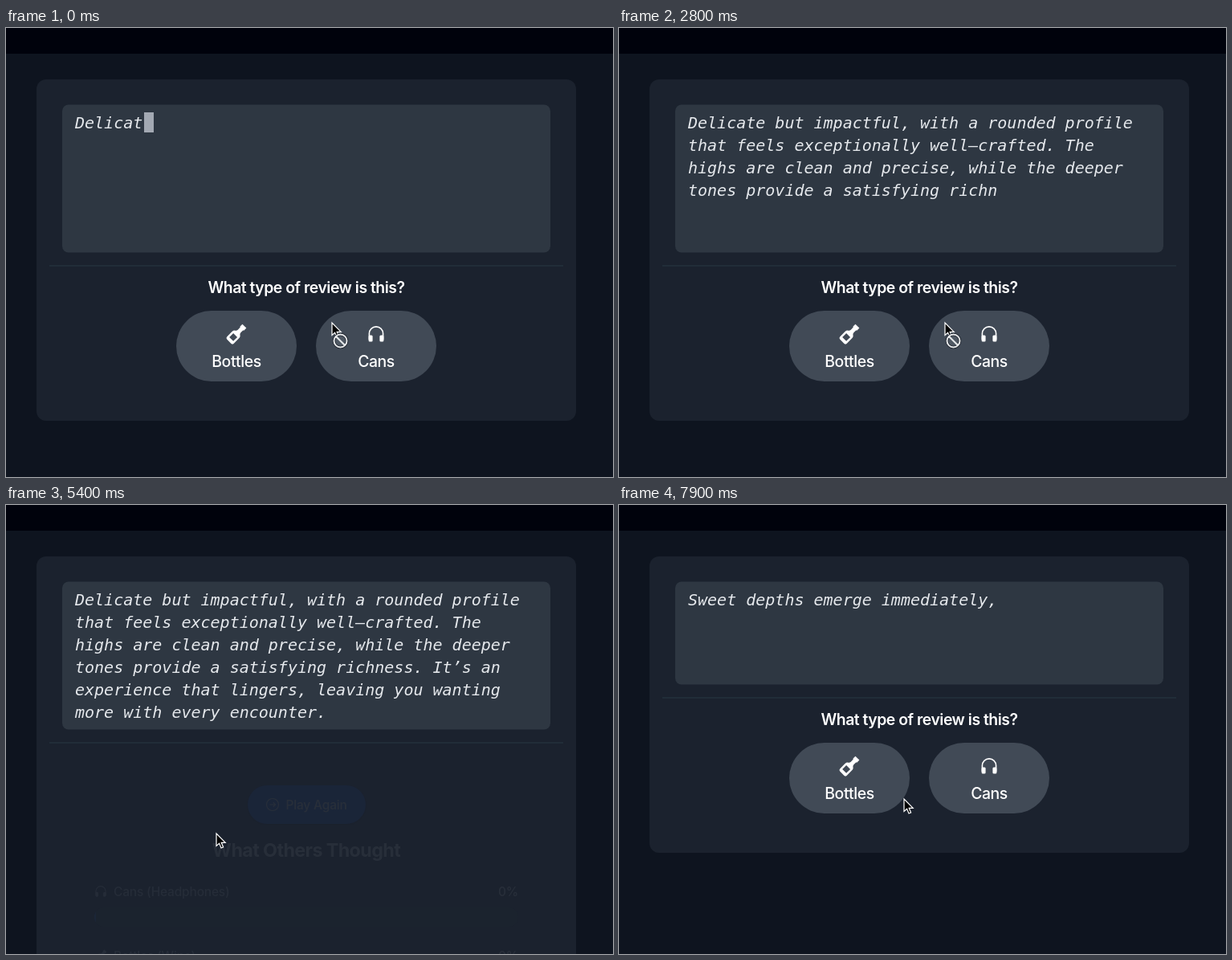
Write an HTML page that moves like this. It is 756 px wide and 559 px high and loops after 8000 ms.

```html
<!DOCTYPE html>
<html lang="en">
<head>
<meta charset="utf-8">
<title>Review guessing game</title>
<style>
  html, body { margin: 0; width: 100%; height: 100%; overflow: hidden; background: #0e141f; }
  svg { display: block; width: 756px; height: 559px; }
  text {
    font: 500 15.5px Inter, "Open Sans", sans-serif;
    font-optical-sizing: none;
    letter-spacing: -.012em;
    fill: #fff;
  }
  .mid { text-anchor: middle; }
  .end { text-anchor: end; }
  .large { font-size: 19.4px; letter-spacing: -.021em; }
  .question { font-size: 19.4px; font-weight: 600; letter-spacing: -.025em; }
  .heading { font-size: 23.3px; font-weight: 700; letter-spacing: -.026em; }
  .label { fill: #d5d9df; }
  #review { font: italic 20px "DejaVu Sans Mono", monospace; letter-spacing: 0; fill: #e5e8ec; }
  .shadow { filter: drop-shadow(0 1px 1px #0008); }
</style>
</head>
<body>
<svg viewBox="0 0 756 559">
  <defs>
    <path id="bottle" transform="rotate(45)" fill-rule="evenodd"
      d="M-3.5-14h7v4l-1 1v4q0 2 2.5 3.5q1 1 1 3v9q0 2.5-2.5 2.5h-7q-2.5 0-2.5-2.5v-9q0-2 1-3q2.5-1.5 2.5-3.5v-4l-1-1zM-3.5 2h7v7h-7z"/>
    <g id="phones">
      <path d="M-8.6 7V-.5a8.6 8.6 0 0 1 17.2 0V7" fill="none" stroke="currentColor" stroke-width="1.6"/>
      <rect x="-9.4" y="1.5" width="5" height="8" rx="1.5"/>
      <rect x="4.4" y="1.5" width="5" height="8" rx="1.5"/>
    </g>
    <clipPath id="track"><rect x="110" y="501" width="528" height="24" rx="12"/></clipPath>
  </defs>

  <rect width="756" height="559" fill="#0e141f"/>
  <rect width="756" height="32" fill="#00020c"/>
  <rect id="card" x="38" y="64" width="672" rx="12" fill="#1b222e"/>
  <rect id="box" x="70" y="95.5" width="608" rx="8" fill="#2e3742"/>
  <text id="review"></text>
  <rect id="caret" width="12" height="25" fill="#a3a9b3"/>

  <g id="lower">
    <rect x="54" y="295.5" width="640" height="1" fill="#283842"/>
    <g id="choices">
      <text class="mid question" x="374" y="330">What type of review is this?</text>
      <g id="bottles">
        <rect x="212" y="352" width="150" height="88" rx="44" fill="#414a56"/>
        <rect class="tint" x="212" y="352" width="150" height="88" rx="44" fill="#d32020"/>
        <use href="#bottle" x="287" y="381" fill="#fff"/>
        <text class="mid large" x="287" y="422">Bottles</text>
      </g>
      <g id="cans">
        <rect x="386" y="352" width="150" height="88" rx="44" fill="#414a56"/>
        <rect class="tint" x="386" y="352" width="150" height="88" rx="44" fill="#1e58e6"/>
        <use href="#phones" x="461" y="381" fill="#fff" color="#fff"/>
        <text class="mid large" x="461" y="422">Cans</text>
      </g>
    </g>
  </g>

  <g id="results">
    <g id="again">
      <rect class="shadow" x="301" y="349" width="147" height="48" rx="24" fill="#1e58e6"/>
      <path d="M324.5 373a7.5 7.5 0 0 1 15 0a7.5 7.5 0 0 1-15 0M328.5 373h7M332.7 370.2l2.8 2.8l-2.8 2.8"
        fill="none" stroke="#fff" stroke-width="1.1"/>
      <text x="348.5" y="378.5">Play Again</text>
    </g>
    <text class="mid heading" x="374" y="437.5">What Others Thought</text>
    <use href="#phones" transform="translate(118 481) scale(.7)" fill="#d5d9df" color="#d5d9df"/>
    <text class="label" x="134" y="486.5">Cans (Headphones)</text>
    <text class="end" id="cansShare" x="638" y="486.5"></text>
    <g clip-path="url(#track)">
      <rect x="110" y="501" width="528" height="24" fill="#2e3742"/>
      <rect id="bar" x="110" y="501" height="24" fill="#3374f2"/>
    </g>
    <use href="#bottle" transform="translate(118 561) scale(.6)" fill="#d5d9df"/>
    <text class="label" x="134" y="566.5">Bottles (Wine)</text>
    <text class="end" id="bottlesShare" x="638" y="566.5"></text>
  </g>

  <g id="pointer">
    <path d="M0 0V15.5L3.6 12.2L6 18L8.6 16.9L6.2 11.3H11.2Z" stroke="#fff" stroke-width="1.2"/>
    <g id="blocked" fill="none">
      <circle cx="10.5" cy="22.5" r="8" fill="#505964" stroke="#20262f" stroke-width="3.6"/>
      <path d="M2.5 22.5a8 8 0 0 1 16 0a8 8 0 0 1-16 0M5 17l11 11" stroke="#e6e8ea" stroke-width="2"/>
    </g>
  </g>
</svg>

<script>
const LOOP = 8000, ENABLE = 3400, CHOOSE = 5300, RESTART = 7320;
const COLUMNS = 47, CHAR = 12.04, LINE = 28;

const FIRST = "Delicate but impactful, with a rounded profile that feels exceptionally well–crafted. " +
  "The highs are clean and precise, while the deeper tones provide a satisfying richness. " +
  "It’s an experience that lingers, leaving you wanting more with every encounter.";
const SECOND = "Sweet depths emerge immediately,";

// Keyframes are [time, value...]
const TYPED = [[0, 7], [1800, 111.3], [2800, 168.3], [4100, 237.3], [4383, 252.3]];
const POINTER = [
  [0, 406, 367], [ENABLE, 406, 367], [3700, 397, 370], [4500, 397, 370], [5250, 262, 409],
  [5700, 262, 409], [6600, 323, 401], [7000, 350, 385], [7300, 350, 385], [7900, 355, 366]
];
const LIFT_CANS = [[ENABLE, 0], [3550, 2], [4561, 2], [4711, 0]];
const LIFT_BOTTLES = [[4733, 0], [4883, 2]];
const LIFT_AGAIN = [[6700, 0], [6850, 2]];

const $ = id => document.getElementById(id);
const clamp = v => Math.min(1, Math.max(0, v));
const smooth = v => v * v * (3 - 2 * v);
const set = (id, attrs) => {
  for (const name in attrs) $(id).setAttribute(name, attrs[name]);
};
const show = (id, on) => set(id, { visibility: on ? "visible" : "hidden" });
const move = (id, x, y) => set(id, { transform: `translate(${x} ${y})` });

function at(keys, t, i = 1) {
  const next = keys.findIndex(k => k[0] > t);
  if (next === 0) return keys[0][i];
  if (next < 0) return keys.at(-1)[i];
  const a = keys[next - 1], b = keys[next];
  return a[i] + (b[i] - a[i]) * (t - a[0]) / (b[0] - a[0]);
}

function wrap(text) {
  const lines = [""];
  for (const word of text.split(" ")) {
    const last = lines.at(-1);
    const joined = last ? last + " " + word : word;
    if (joined.length <= COLUMNS) lines[lines.length - 1] = joined;
    else lines.push(word);
  }
  return lines;
}

function drawReview(t, second) {
  const text = second ? SECOND : FIRST;
  const count = Math.floor(second ? (t - RESTART) * .056 : at(TYPED, t));
  const lines = wrap(text.slice(0, count));
  $("review").innerHTML = lines
    .map((line, i) => `<tspan x="86" y="${125 + i * LINE}">${line}</tspan>`).join("");
  set("caret", { x: 87.7 + lines.at(-1).length * CHAR, y: 105 + (lines.length - 1) * LINE });
  show("caret", t % 1000 < 500 && (second || count < text.length));
}

function draw(t) {
  const second = t >= RESTART;
  const results = t >= CHOOSE && !second;
  const enabled = t >= ENABLE && t < CHOOSE;

  drawReview(t, second);
  set("card", { height: results ? 600 : second ? 369 : 425 });
  set("box", { height: second ? 128 : 184 });
  move("lower", 0, second ? -56 : 0);

  show("choices", !results);
  for (const tint of document.querySelectorAll(".tint")) {
    tint.setAttribute("opacity", enabled ? clamp((t - ENABLE) / 150) : 0);
    tint.classList.toggle("shadow", enabled);
  }
  move("cans", 0, enabled ? -at(LIFT_CANS, t) : 0);
  move("bottles", 0, enabled ? -at(LIFT_BOTTLES, t) : 0);

  show("results", results);
  set("results", { opacity: smooth(clamp((t - CHOOSE) / 700)) });
  move("again", 0, -at(LIFT_AGAIN, t));
  const grown = smooth(clamp((t - CHOOSE - 50) / 1000));
  set("bar", { width: 528 * .47 * grown });
  $("cansShare").textContent = Math.round(47 * grown) + "%";
  $("bottlesShare").textContent = Math.round(53 * grown) + "%";

  move("pointer", at(POINTER, t), at(POINTER, t, 2));
  show("blocked", t < ENABLE);
}

const start = performance.now();
function tick() {
  draw((performance.now() - start) % LOOP);
  requestAnimationFrame(tick);
}
tick();
</script>
</body>
</html>
```
